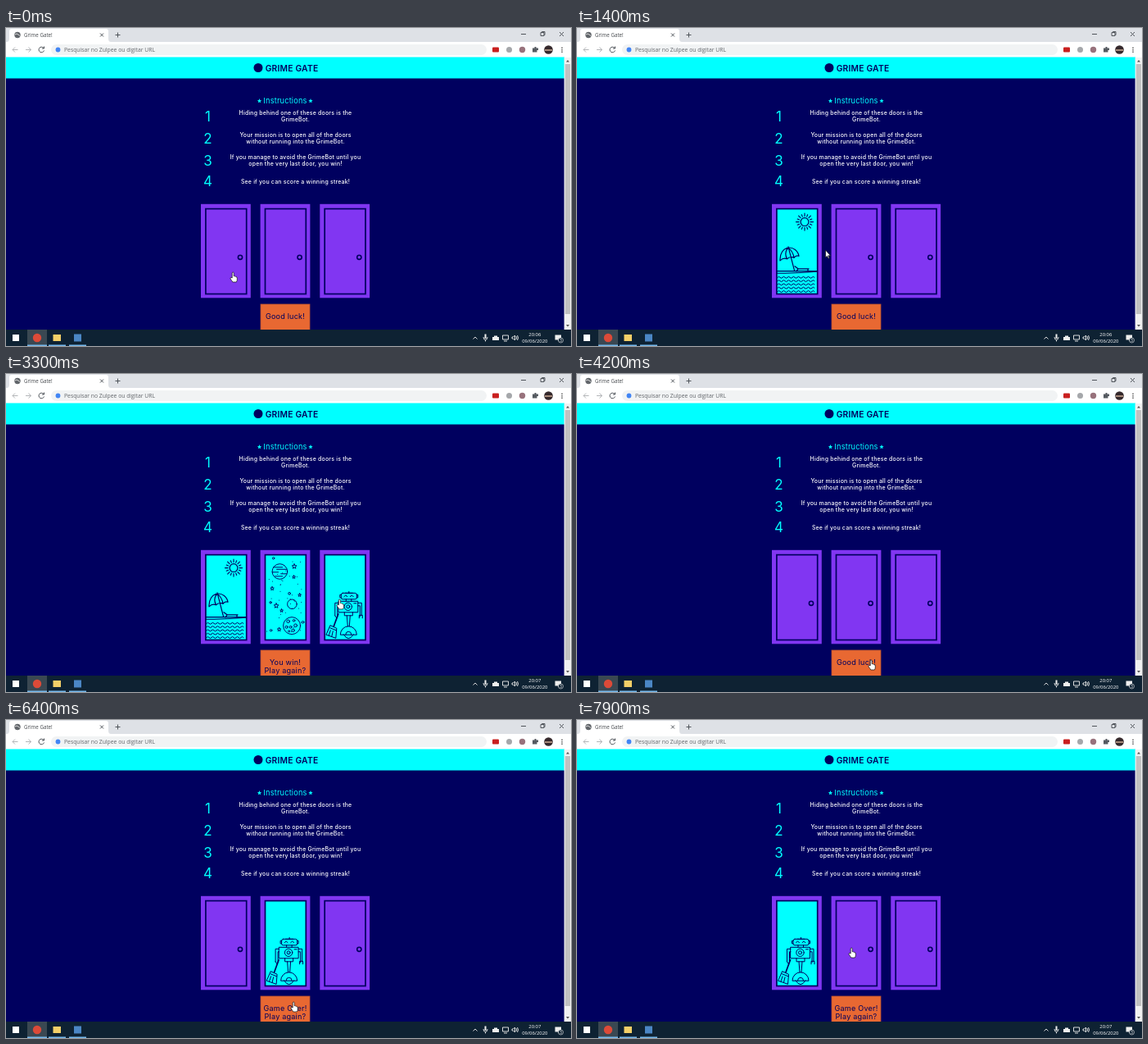
These frames come from a looping animation (690x388 px, 8000 ms). An HTML page:

```html
<!DOCTYPE html>
<html lang="en">
<head>
<meta charset="utf-8">
<title>Grime Gate!</title>
<style>
html, body { margin: 0; width: 100%; height: 100%; overflow: hidden; background: #00005f; }
svg { display: block; width: 690px; height: 388px; }
text { font-family: Inter, sans-serif; letter-spacing: .2px; }
.ui { font-family: "Open Sans", sans-serif; letter-spacing: 0; }
.mid { text-anchor: middle; }
.ink { fill: none; stroke: #00005f; stroke-linecap: round; stroke-linejoin: round; }
.line { fill: none; stroke: #50555b; stroke-width: 1; }
.pale { stroke: #b4b6b9; }
.tray { fill: none; stroke: #eee; stroke-width: .9; }
</style>
</head>
<body>
<svg viewBox="0 0 690 388">
  <defs>
    <g id="closed">
      <circle class="ink" cx="48" cy="65" r="2.6" stroke-width="1.6"/>
    </g>
    <g id="beach" class="ink">
      <circle cx="40" cy="21.8" r="4.9" stroke-width="1.2"/>
      <g id="rays" stroke-width="1.1"></g>
      <path d="M10 69C9.500 60 14 54.500 20 53.300C26 52.500 32 57 33 63.500Q29.500 62 27 65.500Q22.500 63 18.500 67Q14 65 10 69ZM20 53.300Q14.500 59 18.500 67M20 53.300Q26 58 27 65.500M20 52L27.500 81" stroke-width="1.200"/>
      <path d="M28 76L32 79H45M32 79L30 82M44 79V82" stroke-width="1.300"/>
      <path d="M6 81.800H55M6 84.500Q30 84.500 55 82.500" stroke-width="1.100"/>
      <g id="waves" stroke-width="1"></g>
    </g>
    <g id="space" class="ink" stroke-width=".95">
      <circle cx="23.800" cy="26.200" r="9.300"/>
      <path d="M16 21H27M20 23.500H32M14.500 27H22M25 29H32M18 32H27"/>
      <circle cx="38.800" cy="66" r="5.800"/>
      <circle cx="38.500" cy="92.300" r="10.500"/>
      <g id="craters"></g>
      <g id="stars"></g>
      <g id="dots" fill="#00005f" stroke="none"></g>
    </g>
    <g id="bot" class="ink" stroke-width="1">
      <path d="M31 52.500H40M35.500 52.500V50.500M28 52.500H43Q45 52.500 45 55V58Q45 60 43 60H28Q26 60 26 58V55Q26 52.500 28 52.500ZM26 54.500H24.500V58H26M45 54.500H46.500V58H45"/>
      <path d="M29.500 57L31.500 55L33.500 57M37 57L39 55L41 57M32 60V62.500M38.500 60V62.500"/>
      <path d="M23 62.500H46.500V76H23Z"/>
      <circle cx="34.500" cy="69" r="4.700"/><circle cx="34.500" cy="69" r="2"/>
      <path d="M41.500 65H44.500M23 64.500H18.500V80M18.500 80L20.500 83M23 68H21.500V81M46.500 64.500H51V80M46.500 68H49V81M48 83V79.500H52V83"/>
      <path d="M30 76V80H40V76M33 80L34 93M37 80L36 93"/>
      <path d="M25 103A10 10 0 0 1 45 103ZM31.500 103A3.500 3.500 0 0 1 38.500 103M29 103Q35 113 41 103"/>
      <path d="M22.500 78L17 93" stroke-width="1.700"/>
      <path d="M13 92L20.500 95.500L19.500 107.500L8 103.500ZM12.500 95L20 98M13 98L11 104M16 99L14.500 105.500"/>
    </g>
  </defs>

  <!-- browser -->
  <rect width="690" height="17" fill="#dee1e6"/>
  <path d="M1 17Q4 17 4 13V4Q4 1 7 1H122Q125 1 125 4V13Q125 17 128 17Z" fill="#fff"/>
  <rect y="17" width="690" height="19" fill="#fff"/>
  <circle cx="14" cy="8.500" r="3.700" fill="#62666b"/>
  <path d="M11 8Q13 6 15 8T17 9" stroke="#ddd" stroke-width="1" fill="none"/>
  <text class="ui" x="22" y="10.800" font-size="6.200" fill="#45494d">Grime Gate!</text>
  <path class="line" d="M115 6.500L119 10.500M119 6.500L115 10.500M133.500 8.500H139.500M136.500 5.500V11.500M629 7.500H635"/>
  <path class="line" d="M653 5.500H657V9.500H653ZM654.500 5.500V4.500H658V8.500H657M676 5L681 10M681 5L676 10"/>
  <path class="line pale" d="M14.500 26.500H8M11 23.500L8 26.500L11 29.500M24 26.500H30.500M27.500 23.500L30.500 26.500L27.500 29.500"/>
  <path class="line" d="M46 24.500A3.300 3.300 0 1 0 46.500 27.500M46.500 22.500V25H44"/>
  <rect x="55" y="20" width="532" height="13" rx="6.500" fill="#f1f3f4"/>
  <circle cx="63.500" cy="26.500" r="2.900" fill="#4285f4"/>
  <text class="ui" x="71" y="28.900" font-size="6.800" fill="#62666b">Pesquisar no Zulpee ou digitar URL</text>
  <rect x="594" y="23.500" width="8" height="6" rx="1" fill="#c9201f"/>
  <circle cx="614.500" cy="26.500" r="3.500" fill="#a5a7aa"/>
  <circle cx="630.500" cy="26.500" r="3.700" fill="#98727c"/>
  <path d="M643 24.500H645.500V23H647.500V24.500H650V27H648.500V29.500H643Z" fill="#555a60"/>
  <circle cx="662.500" cy="26.500" r="5.300" fill="#35292c"/>
  <path d="M658 26H667V28H658Z" fill="#a78a7a"/>
  <path d="M679 23.500V30" stroke="#555" stroke-width="1.400" stroke-dasharray="1.400 1.100"/>

  <!-- page -->
  <rect y="36" width="682" height="332" fill="#00005f"/>
  <rect y="35.500" width="682" height="26" fill="#0ff"/>
  <circle cx="308" cy="48.500" r="5.500" fill="#00005f"/>
  <text class="mid" x="349" y="52.500" font-size="10.300" font-weight="600" fill="#00005f" letter-spacing=".4">GRIME GATE</text>
  <text class="mid" x="341" y="91.500" font-size="9.200" fill="#0ff">Instructions</text>
  <g id="rules"></g>
  <g id="doors"></g>
  <rect x="311" y="337" width="60" height="32" fill="#e86832" stroke="#b5502f" stroke-width=".8"/>
  <g class="mid" font-size="9.100" fill="#00005f">
    <text id="label1" x="341" y="354.500"></text>
    <text id="label2" x="341" y="364.900"></text>
  </g>
  <rect x="681.600" y="36" width="8.400" height="332" fill="#f1f1f1"/>
  <rect x="682.800" y="44" width="6.200" height="305" fill="#c1c1c1"/>
  <path d="M684 41.500L686 39L688 41.500ZM684 362L686 364.500L688 362Z" fill="#555"/>

  <!-- taskbar -->
  <rect y="368" width="690" height="20" fill="#0e2233"/>
  <rect x="26" y="368" width="24" height="20" fill="#3a4852"/>
  <path d="M26 387.300H50M52 387.300H73M77 387.300H98" stroke="#76b9ed" stroke-width="1.400"/>
  <rect x="8" y="374" width="8" height="8" fill="#fff"/>
  <circle cx="38" cy="378" r="5.200" fill="#dc4a38"/>
  <rect x="57.500" y="374" width="9.500" height="8" fill="#f3cf68"/>
  <rect x="83" y="373.500" width="9" height="9" fill="#4b86c5"/>
  <path class="tray" d="M570.500 379.500L573 377L575.500 379.500M583 377Q583 380.500 585.500 380.500T588 377M585.500 380.500V382.500"/>
  <path d="M584.500 373.500H586.500V379H584.500ZM594 377H596V375.500H600V377H602V381H594Z" fill="#eee"/>
  <path class="tray" d="M606.500 375H613.500V380H606.500ZM608 382H612M618 377H619.500L621.500 375V381L619.500 379H618ZM623 376Q624.500 378 623 380M624.500 375Q626.500 378 624.500 381"/>
  <path d="M670.500 374.500H678V380.500H675.500L674 382.500V380.500H670.500Z" fill="#eee"/>
  <circle cx="677.500" cy="381" r="3" fill="#0e2233" stroke="#eee" stroke-width=".6"/>
  <text class="ui mid" x="677.500" y="382.700" font-size="4.500" fill="#fff">3</text>
  <g class="mid" fill="#fff" font-size="5.900">
    <text class="ui" id="clock" x="645.800" y="375.800"></text>
    <text class="ui" x="645.800" y="384.200">09/06/2020</text>
  </g>

  <g id="cursor" stroke="#111" stroke-width=".7" stroke-linejoin="round" fill="#fff">
    <path id="hand" d="M-1.800 1V-4.800Q-1.800 -6 -.8 -6T.2 -4.800V-1.200Q1.200 -1.900 1.700 -.8Q2.700 -1.300 3.100 -.2Q4.300 -.4 4.300 1V3Q4.300 4.500 3.300 6H-1.200Q-2 4.500 -4 2Q-4.300 .5 -3 .3Z"/>
    <path id="arrow" d="M-1 -6V3L1 1.200L2.300 4.300L3.600 3.700L2.300 .7H5Z"/>
  </g>
</svg>
<script>
const LOOP = 8000, DOOR_X = [238, 310.6, 383.3];
const el = id => document.getElementById(id);
const range = n => [...Array(n).keys()];
const star = (x, y, r) => "M" + range(10).map(i => {
  const a = i * Math.PI / 5 - Math.PI / 2, q = i % 2 ? r * .45 : r;
  return (x + q * Math.cos(a)).toFixed(2) + " " + (y + q * Math.sin(a)).toFixed(2);
}).join("L") + "Z";
const circles = list => list.map(([x, y, r]) => `<circle cx="${x}" cy="${y}" r="${r}"/>`).join("");

el("rays").innerHTML = range(16).map(i =>
  `<path d="M47 21.800H${i % 2 ? 49.5 : 50.5}" transform="rotate(${i * 22.5} 40 21.800)"/>`).join("");
el("waves").innerHTML = range(5).map(i =>
  `<path d="M7 ${89.5 + i * 4.3}q1.500 -2 3 0${"t3 0".repeat(14)}"/>`).join("");
el("craters").innerHTML = circles([[34, 87, 1.8], [41, 86, 1.3], [43, 92, 1.9], [37, 94, 1.4], [32, 94, 1.5], [40, 98, 1.7], [35, 99, 1]]);
el("stars").innerHTML = [[41.5, 20, 3], [41, 33, 2], [14.5, 47, 2.3], [19.5, 68, 3], [26, 74, 2], [23, 97, 2.4], [48, 55, 2]]
  .map(s => `<path d="${star(...s)}"/>`).join("") + circles([[16, 10, 1.2], [35.5, 53, 1.4], [12.5, 64, 1.2], [52, 88, 1.3], [13, 98, 1.2]]);

let seed = 7;
const random = () => (seed = seed * 16807 % 2147483647) / 2147483647;
el("dots").innerHTML = circles(range(38).map(() => [8 + random() * 45, 9 + random() * 98, .5]));

const rules = [
  [113.8, "Hiding behind one of these doors is the", "GrimeBot."],
  [140.9, "Your mission is to open all of the doors", "without running into the GrimeBot."],
  [168, "If you manage to avoid the GrimeBot until you", "open the very last door, you win!"],
  [193.4, "See if you can score a winning streak!"]
];
el("rules").innerHTML = [309.5, 372].map(x => `<path d="${star(x, 88.9, 2.8)}" fill="#0ff"/>`).join("") +
  rules.map(([y, ...lines], i) =>
    `<text class="mid" x="246.500" y="${y}" font-size="17" fill="#0ff">${i + 1}</text>` +
    lines.map((s, k) => `<text class="mid" x="353.500" y="${y - (lines.length > 1 ? 8 : 3.8) + k * 8.2}"
      font-size="6.950" font-weight="500" fill="#fff">${s}</text>`).join("")).join("");

el("doors").innerHTML = DOOR_X.map((x, i) => `<g transform="translate(${x} 214.800)">
  <rect width="60.800" height="114.500" fill="#8136f2"/>
  <rect id="fill${i}" x="5.900" y="5.800" width="49.800" height="103.900" stroke="#00005f" stroke-width="1.700"/>
  <use id="view${i}"/></g>`).join("");

// [start, view behind each door, button lines]
const scenes = [
  [0, ["closed", "closed", "closed"], "Good luck!"],
  [300, ["beach", "closed", "closed"], "Good luck!"],
  [1700, ["beach", "space", "closed"], "Good luck!"],
  [2900, ["beach", "space", "bot"], "You win!", "Play again?"],
  [4000, ["closed", "closed", "closed"], "Good luck!"],
  [5400, ["closed", "bot", "closed"], "Game Over!", "Play again?"],
  [6600, ["closed", "closed", "closed"], "Good luck!"],
  [7300, ["bot", "closed", "closed"], "Game Over!", "Play again?"]
];
// [time, x, y]
const path = [
  [0, 278, 304], [350, 278, 304], [800, 254, 290], [1100, 254, 290], [1600, 332, 270],
  [2200, 332, 270], [2700, 412, 275], [3200, 412, 275], [3800, 360, 355], [4400, 360, 355],
  [5100, 344, 282], [5600, 344, 282], [6200, 352, 350], [6600, 352, 350], [7050, 280, 300],
  [7400, 280, 300], [7900, 336, 284], [8000, 338, 288]
];

function cursorAt(t) {
  const i = path.findIndex(p => p[0] > t);
  const [t0, x0, y0] = path[i - 1], [t1, x1, y1] = path[i];
  const u = (t - t0) / (t1 - t0), e = u * u * (3 - 2 * u);
  return [x0 + (x1 - x0) * e, y0 + (y1 - y0) * e];
}

function draw(t) {
  const [, views, first, second = ""] = scenes.filter(s => s[0] <= t).pop();
  views.forEach((view, i) => {
    el("view" + i).setAttribute("href", "#" + view);
    el("fill" + i).setAttribute("fill", view == "closed" ? "#8136f2" : "#0ff");
  });
  el("label1").textContent = first;
  el("label2").textContent = second;
  el("clock").textContent = t < 3300 ? "20:06" : "20:07";

  const [x, y] = cursorAt(t);
  const overDoor = y > 215 && y < 329 && DOOR_X.some(d => x > d && x < d + 61);
  const overButton = y > 336 && x > 310 && x < 372;
  const link = overDoor || overButton;
  el("cursor").setAttribute("transform", `translate(${x} ${y})`);
  el("hand").style.display = link ? "" : "none";
  el("arrow").style.display = link ? "none" : "";
}

const start = performance.now();
function tick() {
  const t = (performance.now() - start) % LOOP;
  draw(Math.floor(t / 100) * 100);
  requestAnimationFrame(tick);
}
tick();
</script>
</body>
</html>
```
